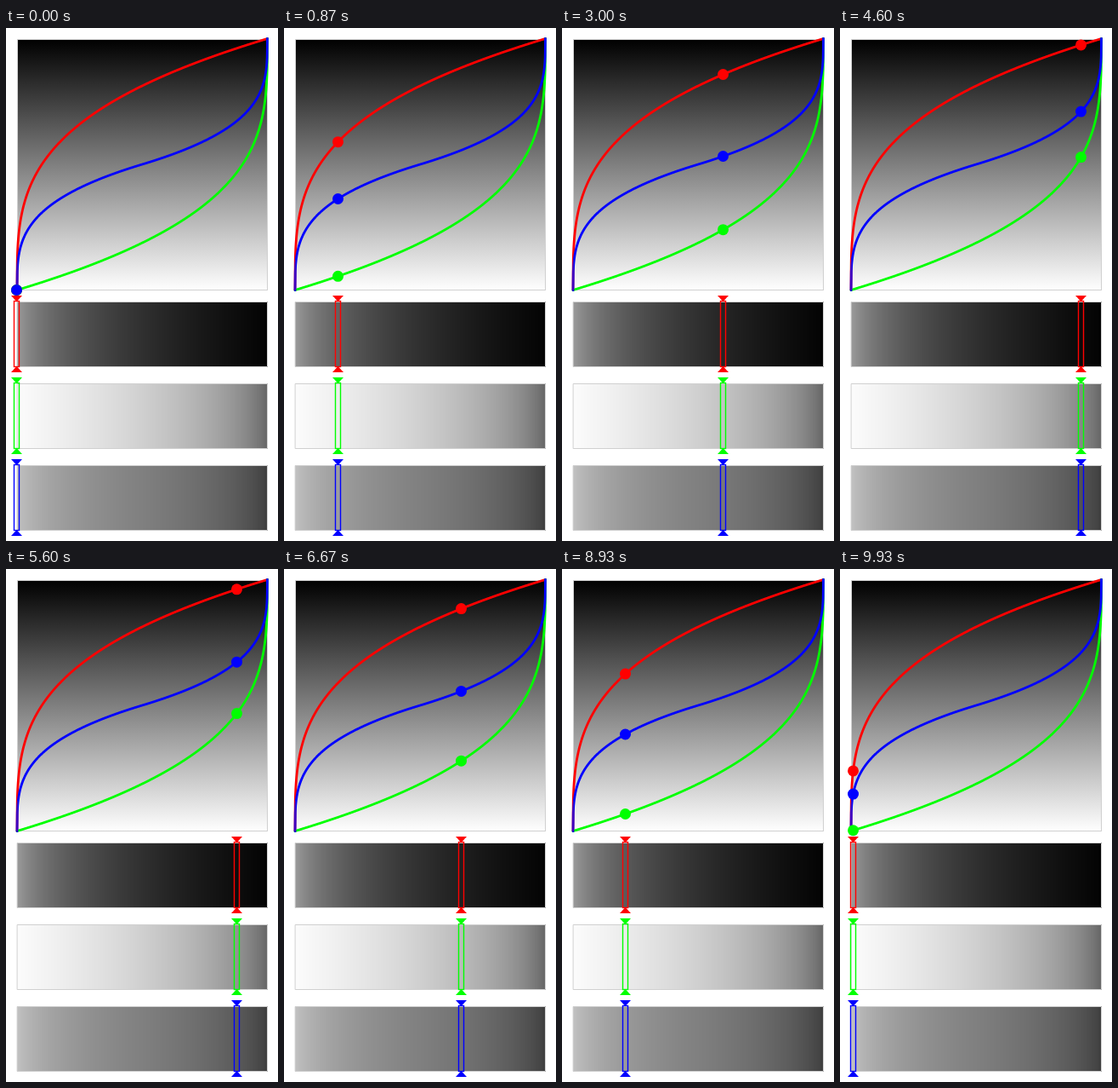
An HTML page with a canvas for the animation above (9.99 s loop, 320 px wide and 602 px high).

```html
<!DOCTYPE html>
<html lang="en">
<head>
<meta charset="utf-8">
<title>Gamma curves</title>
<style>
  html, body { margin: 0; width: 100%; height: 100%; overflow: hidden; background: #fff; }
  canvas { display: block; }
</style>
</head>
<body>
<canvas id="stage" width="320" height="602"></canvas>
<script>
const canvas = document.getElementById('stage');
const ctx = canvas.getContext('2d');

const LOOP = 9990, STEPS = 150, HALF = STEPS / 2;
const LEFT = 13, TOP = 13, SIZE = 295, STRIP_H = 77;
const ORIGIN_X = 12.5, ORIGIN_Y = 307.5;

const easeOut = u => Math.pow(u, 0.3);
const easeIn = u => 1 - easeOut(1 - u);
const easeBoth = u => u < 0.5 ? easeOut(2 * u) / 2 : 1 - easeOut(2 - 2 * u) / 2;

const curves = [
  { color: '#f00', fn: easeOut, stripY: 321 },
  { color: '#0f0', fn: easeIn, stripY: 417 },
  { color: '#00f', fn: easeBoth, stripY: 513 }
];

const curveY = (fn, offset) =>
  ORIGIN_Y - SIZE * fn(Math.min(1, Math.max(0, (offset - 0.5) / (SIZE - 0.5))));

function frameBox(g, y, height) {
  g.strokeStyle = '#d0d0d0';
  g.lineWidth = 1;
  g.strokeRect(LEFT + 0.5, y + 0.5, SIZE - 1, height - 1);
}

function drawPlot(g) {
  const shade = g.createLinearGradient(0, TOP, 0, TOP + SIZE);
  shade.addColorStop(0, '#000');
  shade.addColorStop(1, '#fff');
  g.fillStyle = shade;
  g.fillRect(LEFT, TOP, SIZE, SIZE);
  frameBox(g, TOP, SIZE);
}

function drawCurve(g, { color, fn }) {
  g.beginPath();
  g.moveTo(LEFT + 0.2, ORIGIN_Y);
  for (let offset = 0.5; offset <= SIZE; offset += 0.25) {
    g.lineTo(ORIGIN_X + offset, curveY(fn, offset));
  }
  g.strokeStyle = color;
  g.lineWidth = 2.8;
  g.lineJoin = g.lineCap = 'round';
  g.stroke();
}

function drawStrip(g, { fn, stripY }) {
  for (let x = 0; x < SIZE; x++) {
    const u = 0.045 + 0.91 * x / (SIZE - 1);
    const gray = Math.round(255 * (1 - fn(u)));
    g.fillStyle = `rgb(${gray},${gray},${gray})`;
    g.fillRect(LEFT + x, stripY, 1, STRIP_H);
  }
  frameBox(g, stripY, STRIP_H);
}

function makeBackdrop() {
  const layer = document.createElement('canvas');
  layer.width = canvas.width;
  layer.height = canvas.height;
  const g = layer.getContext('2d');
  g.fillStyle = '#fff';
  g.fillRect(0, 0, layer.width, layer.height);
  drawPlot(g);
  curves.forEach(curve => drawCurve(g, curve));
  // red shows through where it shares the left edge with blue
  g.fillStyle = 'rgba(255,0,0,0.25)';
  g.fillRect(12, 272, 2, 36);
  curves.forEach(curve => drawStrip(g, curve));
  return layer;
}

function drawTriangle(x, baseY, tipY) {
  ctx.beginPath();
  ctx.moveTo(x - 6.5, baseY);
  ctx.lineTo(x + 6.5, baseY);
  ctx.lineTo(x, tipY);
  ctx.fill();
}

function drawMarker({ color, stripY }, x) {
  const bottom = stripY + STRIP_H;
  ctx.fillStyle = ctx.strokeStyle = color;
  ctx.lineWidth = 1.4;
  ctx.strokeRect(x - 3, stripY - 0.5, 6, STRIP_H);
  drawTriangle(x, stripY - 7, stripY);
  drawTriangle(x, bottom + 6, bottom - 1);
}

function drawDot({ color, fn }, offset) {
  ctx.fillStyle = color;
  ctx.beginPath();
  ctx.arc(ORIGIN_X + offset, curveY(fn, offset), 6.5, 0, 2 * Math.PI);
  ctx.fill();
}

// Steps of 1/15 s, with start times rounded to 10 ms.
const stepStart = step => Math.round(step * 20 / 3) * 10;

function stepAt(time) {
  let step = Math.min(STEPS - 1, Math.ceil(time * 0.015));
  while (stepStart(step) > time) step--;
  return step;
}

const backdrop = makeBackdrop();
const startTime = performance.now();

function render(now) {
  const step = stepAt(Math.max(0, now - startTime) % LOOP);
  const travel = HALF - Math.abs(HALF - step);
  const offset = Math.floor(travel * SIZE / HALF);

  ctx.drawImage(backdrop, 0, 0);
  curves.forEach(curve => drawDot(curve, offset));
  curves.forEach(curve => drawMarker(curve, ORIGIN_X + offset));
  requestAnimationFrame(render);
}

render(startTime);
</script>
</body>
</html>
```
